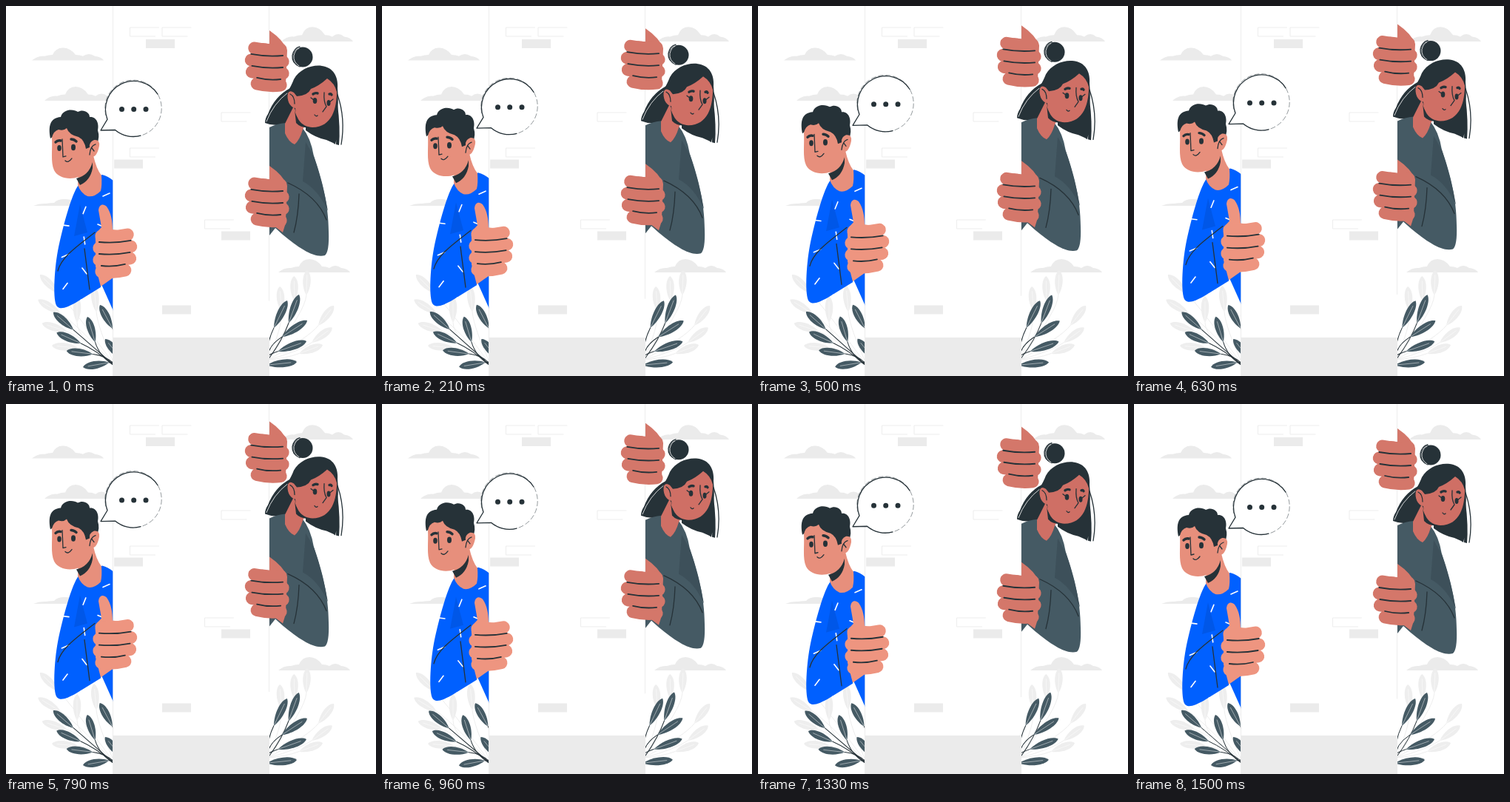
An HTML page for the animation above (1.54 s loop, 500 by 500 pixels).

```html
<!DOCTYPE html>
<html lang="en">
<head>
<meta charset="utf-8">
<title>Peeking around the wall</title>
<style>
html, body { margin: 0; width: 100%; height: 100%; overflow: hidden; background: #fff; }
svg { display: block; width: 100%; height: 100%; }
path { stroke-linecap: round; stroke-linejoin: round; }
.line { fill: none; stroke: #263238; stroke-width: 1.3; }
.brow { stroke-width: 3.4; }
.shine { fill: none; stroke: #fff; stroke-width: .8; }
.dark { fill: #263238; }
.pale { fill: #ebebeb; }
.outline { fill: none; stroke: #e9e9e9; stroke-width: .8; }
.dash { fill: none; stroke: #fff; stroke-width: 1.6; }
.finger { fill: none; stroke: currentColor; stroke-width: 17; }
.crease { stroke-width: 1.8; }
.boy { color: #ee9580; }
.girl { color: #d4776a; }
.face { fill: #e78f7c; }
.girl .face { fill: #cf6f65; }
</style>
</head>
<body>
<svg viewBox="0 0 500 500">
  <defs>
    <clipPath id="leftSide"><path d="M0 -30H144.3V530H0Z"/></clipPath>
    <clipPath id="rightSide"><path d="M356 -30H500V530H356Z"/></clipPath>
    <path id="cloud" d="M0 0Q8 -7 17 -6Q23 -8 28 -8Q32 -18 42 -18Q52 -18 59 -8Q65 -8 69 -6Q77 -12 85 -6Q94 -5 97 0Z"/>
    <g id="fingers"></g>
  </defs>

  <g id="clouds" class="pale"></g>
  <g id="backPlants"></g>
  <g clip-path="url(#leftSide)"><g id="plantLeft"></g></g>
  <g clip-path="url(#rightSide)"><g id="plantRight"></g></g>

  <path class="pale" d="M145 448H356V500H145Z"/>
  <g id="bricks"></g>
  <path class="outline" d="M144.500 0V500"/>

  <g class="float boy">
    <g clip-path="url(#leftSide)">
      <path fill="#0060ff" d="M98 242C89 253 77 297 70 331C65 358 63 399 69 406C74 411 83 407 94 401L128 380V374L145 412V236Q138 230 130 228Z"/>
      <path fill="#0057e8" d="M100 268L92 311L110 306Z"/>
      <g id="dashes"></g>
      <path class="line" d="M70 358C75 338 100 322 120 306M106 328L113 383"/>
    </g>
    <path class="face" d="M118 202Q122 220 129 229Q130 242 128 250Q119 259 110 257Q101 253 97 242L98 222Z"/>
    <path class="dark" d="M95 233Q112 229 117 211V219Q114 236 100 242Z"/>
    <path class="dark" d="M60 179C57 163 59 151 74 150C77 139 91 139 97 143C104 139 113 143 113 150C123 149 126 160 124 168Q127 177 123 186L112 196H102L72 170Z"/>
    <path class="face" d="M62 178Q64 169 71 167Q78 169 82 165Q85 174 98 177Q106 181 108 193L113 191Q112 184 119 181Q127 180 126 189Q123 204 116 204Q113 224 98 231C86 235 71 233 65 222C60 211 63 194 62 178Z"/>
    <path class="line" d="M113 201Q114 189 121 187M116 192L119 196M76 180L77 204L81 203M80 209Q84 213 89 206"/>
    <path class="line brow" d="M67 184Q70 181 74 182M88 180Q92 180 95 183"/>
    <ellipse class="dark" cx="72" cy="192" rx="2.800" ry="4"/>
    <ellipse class="dark" cx="91" cy="191" rx="3" ry="4.200"/>
    <path fill="currentColor" d="M125 276C126 267 132 267 136 271C142 279 144 291 144 302L164 305V360L145 367L128 379L121 352V318Q119 308 129 299Z"/>
    <use href="#fingers" transform="translate(500 252) scale(-1 1)"/>

    <circle cx="172" cy="138.300" r="38.200" fill="#fff" stroke="#263238" stroke-width=".5" stroke-dasharray="7 3"/>
    <path class="line" style="fill:#fff" d="M182 175.200A38.200 38.200 0 0 1 147.500 167.500L128 168L137 153.200A38.200 38.200 0 0 1 205 119.200"/>
    <path class="line" style="stroke-width:7" d="M156.500 139.500h0M172.700 139.500h0M189 139.500h0"/>
  </g>

  <g class="float girl">
    <path class="outline" d="M355.500 -20V398"/>
    <path class="dark" d="M384 111Q363 122 354 146Q350 152 350 158Q362 163 377 160L392 140ZM405 161L434 150L447 133Q449 172 445 187L442 185L433 181Q418 178 405 168ZM448 133Q452 165 450 188L446 187Z"/>
    <path class="line" d="M448 120Q459 152 453 187"/>
    <path class="shine" d="M381 117Q361 132 352 156"/>
    <g clip-path="url(#rightSide)">
      <path fill="#455a64" d="M356 164Q366 159 378 158L400 164Q412 178 416 203C426 231 436 267 436 305Q437 332 431 337C417 341 397 328 374 309L364 300L356 310Z"/>
      <path fill="#3d505a" d="M405 184L401 237Q422 248 435 277Q429 242 416 203Z"/>
      <path class="line" d="M381 239Q421 257 433 289M396 254Q395 284 389 306"/>
    </g>
    <path class="face" d="M389 135L377 159V172Q382 184 390 187Q397 181 401 167L407 155Z"/>
    <path class="dark" d="M390 140Q392 156 414 164Q399 166 392 158Z"/>
    <circle class="dark" cx="401" cy="69" r="13.500"/>
    <path class="line" d="M397 82Q386 77 387 67Q389 57 397 55"/>
    <path class="shine" d="M396 81Q388 76 389 67Q391 59 396 57"/>
    <path class="dark" d="M380 117Q386 107 389 99C397 85 414 79 427 81C442 83 449 95 448 111Q450 132 447 150L432 158L392 143Z"/>
    <path class="face" d="M393 122Q408 121 412 112Q423 108 434 98Q444 104 447 116C447 137 441 164 414 164C401 163 392 155 391 138C383 137 379 126 381 118Q383 113 389 117Z"/>
    <path class="line" d="M384 119Q390 122 390 132M430 117Q429 129 433 136L428 143M417 147Q419 150 421 148M416 127L412 124M437 130L442 126"/>
    <path class="line brow" d="M415 119Q418 117 421 118M437 119Q439 118 440 120"/>
    <ellipse class="dark" cx="417.500" cy="128" rx="2.800" ry="4"/>
    <ellipse class="dark" cx="436" cy="131" rx="2.500" ry="4"/>
    <path fill="currentColor" d="M358 290H379L374 306L362 297Z"/>
    <g id="grip">
      <path fill="currentColor" d="M356 33Q375 46 380 60L378 106H335V52Q348 48 356 52Z"/>
      <use href="#fingers"/>
    </g>
    <use href="#grip" y="183"/>
  </g>
</svg>
<script>
const LOOP = 1540, CYCLE = 1500, LIFT = 10;
const get = id => document.getElementById(id);
const repeat = (n, make) => Array.from({ length: n }, (_, i) => make(i)).join('');
const mix = (a, b, t) => a + (b - a) * t;
const curve = (a, c, b, t) => mix(mix(a, c, t), mix(c, b, t), t);

function finger(i) {
  const y = 57 + 16 * i;
  const tip = 331 + 2.8 * (i - 1.3) ** 2, knuckle = 374.5 - 1.5 * (i - 1.5) ** 2;
  const sag = (top, cls) => `<path class="${cls}" d="M${tip} ${top}Q${(tip + knuckle) / 2} ${top + 4} ${knuckle} ${top + 2}"/>`;
  return sag(y, 'finger') + (i ? sag(y - 8, 'line crease') : '');
}

// Leaf tips follow a quadratic curve while the leaf direction turns; every leaf is tied to the root.
function fan({ n, from, via = from, to = from, turn, len, root, fill, stem }) {
  return repeat(n, i => {
    const t = n > 1 ? i / (n - 1) : 0;
    const x = curve(from[0], via[0], to[0], t), y = curve(from[1], via[1], to[1], t);
    const a = mix(turn[0], turn[1], t) * Math.PI / 180;
    const at = (k, w = 0) => `${x + Math.cos(a) * len * k - Math.sin(a) * w} ${y + Math.sin(a) * len * k + Math.cos(a) * w}`;
    return `<path fill="none" stroke="${stem}" d="M${at(1)}Q${at(1.6)} ${root}"/>` +
      `<path fill="${fill}" d="M${at(0)}C${at(.15, 7)} ${at(.65, 7)} ${at(1)}C${at(.65, -7)} ${at(.15, -7)} ${at(0)}"/>` +
      `<path fill="none" stroke="#fff" stroke-opacity=".8" stroke-width=".6" d="M${at(.2)}L${at(.95)}"/>`;
  });
}

function plant(id, look, fans) {
  get(id).innerHTML += fans.map(f => fan({ ...look, ...f })).join('');
}

const pale = { fill: '#eee', stem: '#eee' }, slate = { fill: '#455a64', stem: '#263238' };
const leftRoot = [148, 487], rightRoot = [354, 478];

plant('backPlants', { ...pale, root: leftRoot, len: 36 }, [
  { n: 4, from: [46, 363], via: [36, 415], to: [62, 459], turn: [45, 5] },
  { n: 2, from: [96, 392], to: [119, 378], turn: [90, 85] }
]);
plant('backPlants', { ...pale, root: rightRoot, len: 34 }, [
  { n: 3, from: [370, 379], via: [390, 362], to: [407, 357], turn: [86, 92] },
  { n: 1, from: [444, 329], turn: [120] },
  { n: 3, from: [443, 405], via: [446, 438], to: [428, 458], turn: [128, 160] }
]);
plant('plantLeft', { ...slate, root: leftRoot, len: 36 }, [
  { n: 4, from: [64, 414], via: [64, 457], to: [104, 488], turn: [41, -10] },
  { n: 3, from: [110, 420], via: [132, 373], to: [134, 450], turn: [73, 51] },
  { n: 1, from: [133, 492], turn: [5] }
]);
plant('plantRight', { ...slate, root: rightRoot, len: 41 }, [
  { n: 1, from: [437, 387], turn: [147] },
  { n: 2, from: [396, 390], to: [380, 398], turn: [110, 116] },
  { n: 3, from: [407, 425], via: [412, 453], to: [393, 481], turn: [147, 174] }
]);

get('fingers').innerHTML = repeat(4, finger);

get('dashes').innerHTML = '<path class="dash" d="M131 257L140 253M124 295L131 298"/>' + repeat(7, i =>
  `<path class="dash" d="M-5 0H5" transform="translate(${i % 2 ? 80 : 106} ${276 + 20.5 * i}) rotate(${75 * i - 68})"/>`);

get('clouds').innerHTML = [[35, 73.5, .95], [52, 128, 1.05], [37, 270, .5], [372, 48, 1.1], [368, 360, 1]]
  .map(([x, y, h]) => `<use href="#cloud" transform="translate(${x} ${y}) scale(1 ${h})"/>`).join('');

const bricks = (places, shape) => places.map(p => `<path transform="translate(${p})" ${shape}/>`).join('');
get('bricks').innerHTML =
  bricks([[189, 45], [146, 207.5], [291, 304.5], [211, 404.5]], 'class="pale" d="M0 0h39v12h-39z"') +
  bricks([[167.5, 29], [211, 29], [291, 144], [167.5, 192], [268.5, 289]], 'class="outline" d="M39 0H0V12H34"');

const floats = document.querySelectorAll('.float');

function draw() {
  const p = Math.min(performance.now() % LOOP / CYCLE, 1);
  const rise = LIFT * (1 - Math.abs(1 - 2 * p));
  const sway = p < .25 ? 4 * p : p < .75 ? 2 - 4 * p : 4 * p - 4;
  floats.forEach(g => g.setAttribute('transform', `translate(0 ${-rise})`));
  get('plantLeft').setAttribute('transform', `rotate(${sway} 146 497)`);
  get('plantRight').setAttribute('transform', `rotate(${sway} 356 490)`);
  requestAnimationFrame(draw);
}
draw();
</script>
</body>
</html>
```
